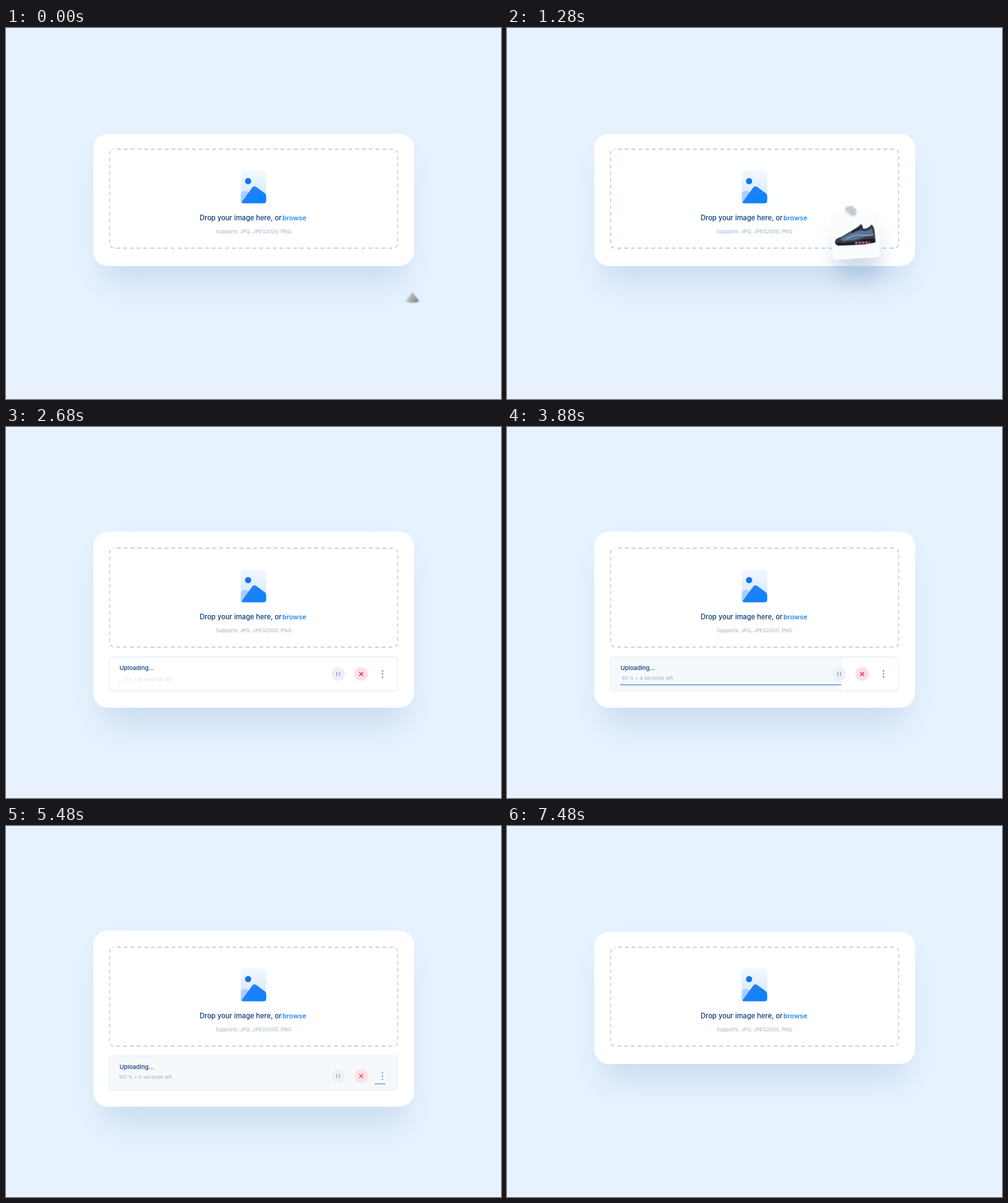
An HTML page that plays this animation: 800 px wide and 600 px high, repeating every 7520 ms.

```html
<!DOCTYPE html>
<html lang="en">
<head>
<meta charset="utf-8">
<title>Image upload</title>
<style>
  html, body { margin: 0; width: 100%; height: 100%; overflow: hidden; background: #e7f2fe; }
  svg { display: block; width: 800px; height: 600px; }
  text { font-family: Inter, "Open Sans", sans-serif; }
  .dark { fill: #0b3a75; font-weight: 500; }
  .link { fill: #0d7bf2; font-weight: 500; }
  .pale { fill: #9bb0c8; font-size: 8.1px; }
  .ghost { fill: #9db1c8; }
  #cardShade { fill: #6f9ac6; opacity: .24; filter: blur(24px); }
  #photoShade { fill: #6f95bf; opacity: .3; filter: blur(15px); }
  #iconShade { fill: #4d9dff; filter: blur(6px); }
  #shoe { filter: blur(.6px); }
  #pointer { filter: blur(.8px); }
</style>
</head>
<body>
<svg viewBox="0 0 800 600">
  <defs>
    <linearGradient id="page" x2="0" y2="1">
      <stop stop-color="#f3f8ff"/><stop offset="1" stop-color="#cfe4ff"/>
    </linearGradient>
    <linearGradient id="hill" x2="1" y2="1">
      <stop stop-color="#2f7df0"/><stop offset="1" stop-color="#0784ff"/>
    </linearGradient>
    <linearGradient id="peak" x2="1" y2=".4">
      <stop stop-color="#d9dce0"/><stop offset="1" stop-color="#85898f"/>
    </linearGradient>
    <path id="mount" d="M-18.500 23.500 L-2 1 Q1 -2.800 5 .5 L18.500 10.500 Q20.500 12 20.500 15 V22 Q20.500 26.500 16 26.500 H-16.500 Q-20.500 26.500 -18.500 23.500Z"/>
    <g id="mini">
      <rect x="-20.500" y="-26.500" width="41" height="53" rx="4" fill="#eaf1f9" opacity=".8"/>
      <circle class="ghost" cx="-9" cy="-9" r="5"/>
      <use href="#mount" class="ghost"/>
    </g>
  </defs>

  <rect id="cardShade" x="153" width="494" rx="24"/>
  <rect id="card" x="141" width="518.500" rx="24" fill="#fff"/>

  <rect id="zone" x="167.500" y="196" width="465.500" height="160" rx="7" fill="#e7f2fe"/>
  <rect id="dash" x="167.500" y="196" width="465.500" height="160" rx="7" fill="none" stroke-dasharray="6 5" stroke-dashoffset="6"/>

  <use id="left" href="#mini"/>
  <use id="right" href="#mini"/>
  <g id="icon">
    <ellipse id="iconShade" cy="27" rx="19" ry="7"/>
    <rect x="-20.500" y="-26.500" width="41" height="53" rx="4" fill="url(#page)"/>
    <path d="M-20.500 10 Q-14 3 -8 9 L-4 26 H-17 Q-20.500 26 -20.500 22Z" fill="#a9cfff"/>
    <circle cx="-8.700" cy="-9.300" r="5" fill="#1275e8"/>
    <use href="#mount" fill="url(#hill)"/>
  </g>

  <text class="dark" x="313" y="311" font-size="11.150">Drop your image here, or</text>
  <text class="link" x="485.500" y="311" font-size="11">browse</text>
  <text class="pale" x="400" y="332" text-anchor="middle">Supports: JPG, JPEG2000, PNG</text>

  <g id="row">
    <clipPath id="done"><rect id="fill" x="167" y="371" height="57"/></clipPath>
    <rect id="tint" x="167" y="372" width="465.500" height="55" rx="6" fill="#f6f9fc" clip-path="url(#done)"/>
    <rect x="167" y="372" width="465.500" height="55" rx="6" fill="none" stroke="#e6eef6" stroke-width="1.400"/>
    <text class="dark" x="183.500" y="393" font-size="9.600">Uploading...</text>
    <text id="status" class="pale" x="268.500" text-anchor="end"></text>
    <path id="line" stroke="#5598e0" stroke-width="1.400"/>
    <g id="tools" fill="none">
      <circle cx="537" cy="399.500" r="11" fill="#ebf0f7"/>
      <path d="M534.500 396v7m4.500-7v7" stroke="#7f97b5" stroke-width="1.200"/>
      <circle cx="574" cy="399.500" r="11" fill="#ffdfe4"/>
      <path d="M571 396.500l6 6m0-6l-6 6" stroke="#ec1c43" stroke-width="1.300"/>
      <path d="M608.500 394.500v.01m0 5v.01m0 5v.01" stroke="#4379bd" stroke-width="2.300" stroke-linecap="round"/>
    </g>
  </g>

  <g id="photo">
    <rect id="photoShade" x="-34" y="-4" width="70" height="76" rx="8"/>
    <rect x="-38.500" y="-38.500" width="77" height="77" rx="6" fill="#fbfcfd"/>
    <g id="shoe" transform="rotate(3)">
      <path d="M-32 9 Q-31 5 -22 3 L-8 -5 L4 -12 L10 -17 Q13 -16 13 -10 Q20 -8 27 -16 Q31 -14 32 -4 L33 12 Q20 17 2 16 L-28 17 Q-34 15 -32 9Z" fill="#3a3d4c"/>
      <path d="M-24 6 L-6 -3 L9 -7 Q19 -3 27 -10 L30 1 Q14 3 2 8 L-20 10Z" fill="#587594"/>
      <path d="M-15 7 Q0 -1 12 1 T30 0" fill="none" stroke="#8da9c1" stroke-width="1.500"/>
      <path d="M-5 -4 L6 -10 L11 -13" fill="none" stroke="#222631" stroke-width="3.500"/>
      <path d="M-32 12 Q-10 14 4 10 T32 7 L33 13 Q12 17 -28 17Z" fill="#1d1d26"/>
      <path d="M0 13 H24" stroke="#a5687f" stroke-width="4" stroke-dasharray="4 1.500"/>
    </g>
  </g>

  <g id="pointer">
    <path id="arrow" d="M0 -9 L11 6 Q0 11 -11 6Z" fill="url(#peak)"/>
    <g id="grip" fill="none" stroke-linecap="round">
      <ellipse rx="11" ry="7" transform="rotate(35)" fill="#dfe3e9"/>
      <path d="M-7 -4 L5 6 M-4 -7 L8 4 M1 -8 L9 -1" stroke="#9ba1aa" stroke-width="1.500"/>
    </g>
    <ellipse id="ring" rx="9" ry="6.500" fill="#f1f4f7" stroke="#b3bac3" stroke-width="2.200"/>
  </g>
</svg>

<script>
const LOOP = 7520;
const el = id => document.getElementById(id);
const set = (id, attrs) => {
  for (const name in attrs) el(id).setAttribute(name, attrs[name]);
};
const mix = (a, b, k) => a + (b - a) * k;
const part = (t, from, to) => Math.min(1, Math.max(0, (t - from) / (to - from)));
const smooth = k => k < .5 ? 2 * k * k : 1 - 2 * (1 - k) ** 2;
const ramp = (t, from, to) => smooth(part(t, from, to));
const pulse = (t, a, b, c, d) => ramp(t, a, b) - ramp(t, c, d);

function drawPanel(t) {
  const open = pulse(t, 2120, 2580, 6400, 6860);
  const y = mix(171, 169, open), h = mix(214, 285, open);
  set('card', { y, height: h });
  set('cardShade', { y: y + 30, height: h - 3 });

  const active = pulse(t, 1250, 1450, 2040, 2240);
  set('zone', { opacity: active });
  set('dash', {
    stroke: `rgb(${mix(182, 13, active)},${mix(195, 120, active)},${mix(211, 242, active)})`,
    'stroke-width': mix(1.3, 1.6, active)
  });

  const lift = pulse(t, 1270, 1570, 2020, 2260);
  set('icon', { transform: `translate(400 ${257 - 13.5 * lift})` });
  set('iconShade', { opacity: lift * .6 });
  for (const [id, x, y, turn] of [['left', 374.5, 252, -12], ['right', 427, 251, 12]])
    set(id, {
      transform: `translate(${mix(400, x, lift)} ${mix(257, y, lift)}) rotate(${turn * lift}) scale(.72)`,
      opacity: lift * .85
    });
}

function drawRow(t) {
  set('row', { opacity: pulse(t, 2350, 2600, 6150, 6450) });

  const u = part(t, 2680, 5080);
  const p = 1 - (1 - u) ** 2.56;
  const end = mix(183, 613, p);
  const start = mix(183, 613, ramp(t, 5080, 5547));
  set('line', { d: `M${start} 417H${end}`, opacity: start < end ? 1 : 0 });
  set('fill', { width: end - 167 + 19.5 * p ** 12 });
  set('tint', { opacity: part(t, 2680, 2980) });

  const shown = ramp(t, 2590, 2790);
  set('status', { y: mix(413, 409, shown), opacity: shown });
  el('status').textContent =
    `${Math.round(u * 100)}\u2009% • ${Math.ceil(8 * (1 - u))} seconds left`;

  const gone = part(t, 5380, 5640);
  set('tools', { transform: `translate(0 ${13 * gone})`, opacity: 1 - gone * gone });
}

function drawDrag(t) {
  const e = ramp(t, 540, 1440);
  const x = mix(650, 561, ramp(e, .286, 1));
  const y = mix(505, 323, e);
  const drop = ramp(t, 1560, 1840);
  const size = ramp(t, 280, 540) * (1 - drop);
  set('photo', {
    transform: `translate(${x} ${y}) rotate(${-4 * (1 - drop)}) scale(${size})`,
    opacity: Math.min(1, size * 2)
  });

  const reach = ramp(t, 40, 440);
  const px = mix(657, x - 7 * (1 - drop), reach);
  const py = mix(436, y - 38 * (1 - drop), reach);
  set('pointer', {
    transform: `translate(${px} ${py})`,
    opacity: 1 - ramp(t, 1880, 2000)
  });
  set('arrow', { opacity: 1 - ramp(t, 280, 400) });
  set('grip', { opacity: pulse(t, 280, 400, 1640, 1800) });
  set('ring', { opacity: ramp(t, 1640, 1800) });
}

// Right-align the link so both halves of the prompt meet.
document.querySelector('.link').setAttribute('text-anchor', 'end');

function frame() {
  const t = performance.now() % LOOP;
  drawPanel(t);
  drawRow(t);
  drawDrag(t);
  requestAnimationFrame(frame);
}
frame();
</script>
</body>
</html>
```
